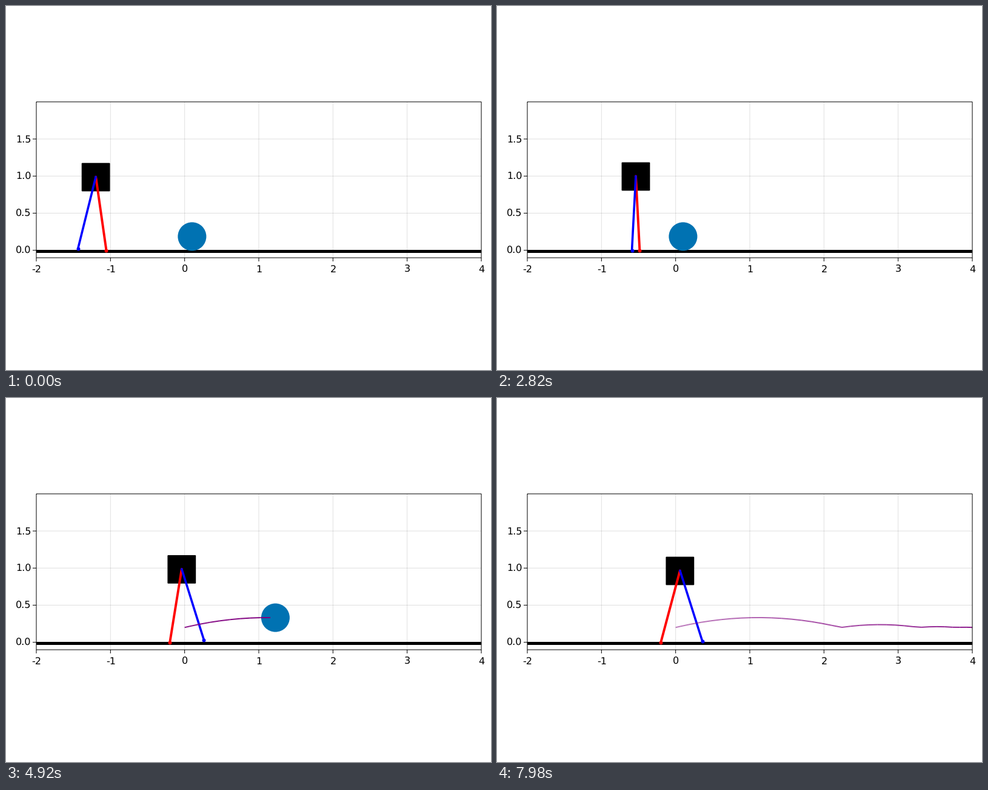
A matplotlib script for the animation above (8000 ms loop, 800x600 px).

```python
import numpy as np
import matplotlib.pyplot as plt
from matplotlib.animation import FuncAnimation
from matplotlib.collections import LineCollection
from matplotlib.patches import Circle, Rectangle

DPI = 100
PT = 72 / DPI                      # points per pixel
SCALE = 734 / 6                    # pixels per unit
LEFT, RIGHT, TOP, BOTTOM = 50, 784, 158, 415

plt.rcParams["font.family"] = "DejaVu Sans"
plt.rcParams["text.hinting"] = "none"
plt.rcParams["path.snap"] = False
fig = plt.figure(figsize=(8, 6), dpi=DPI, facecolor="white")
ax = fig.add_axes([0, 0, 1, 1])
ax.set_xlim(0, 800)
ax.set_ylim(600, 0)
ax.axis("off")


def px(x):
    return LEFT + (x + 2) * SCALE


def py(y):
    return 402.7 - y * SCALE


def line(xs, ys, color, width, z, **kw):
    kw.setdefault("solid_capstyle", "butt")
    return ax.plot(xs, ys, color=color, lw=width * PT, zorder=z, **kw)[0]


# Axis frame, grid and labels
for v in range(-2, 5):
    x = px(v)
    if -2 < v < 4:
        line([x, x], [TOP, BOTTOM], (0, 0, 0, 0.12), 1, 1)
    line([x, x], [BOTTOM, BOTTOM + 6], "black", 1, 9)
    ax.text(x + 0.5, 439, str(v), fontsize=16 * PT,
            ha="center", va="baseline")
for v in (0.0, 0.5, 1.0, 1.5):
    y = py(v)
    line([LEFT, RIGHT], [y, y], (0, 0, 0, 0.12), 1, 1)
    line([LEFT - 6, LEFT], [y, y], "black", 1, 9)
    ax.text(41.5, y + 5.5, f"{v:.1f}", fontsize=16 * PT,
            ha="right", va="baseline")
line([LEFT, RIGHT, RIGHT, LEFT, LEFT], [TOP, TOP, BOTTOM, BOTTOM, TOP],
     "black", 1, 9, solid_joinstyle="miter")
line([LEFT, RIGHT], [404.5, 404.5], "black", 5, 2)

# Moving parts
SIDE = 44.8                        # plus a rounded 2 px outline
ball = ax.add_patch(Circle((0, 0), 23.5, fc="#0072B2", ec="none", zorder=3))
body = ax.add_patch(Rectangle((0, 0), SIDE, SIDE, fc="black", ec="black",
                              lw=2 * PT, joinstyle="round", zorder=4))
legs = [line([], [], c, w, z, solid_capstyle="round")
        for c, w, z in (("red", 3.9, 5), ("blue", 3.6, 6))]
feet = [line([], [], c, 0, z, marker="o", ms=6 * PT, mew=0, ls="none")
        for c, z in (("red", 5), ("blue", 6))]
trail = ax.add_collection(LineCollection([], linewidths=2 * PT, zorder=7,
                                         capstyle="butt"))
window = Rectangle((LEFT, TOP), RIGHT - LEFT, BOTTOM - TOP,
                   transform=ax.transData)
for part in (ball, trail):
    part.set_clip_path(window)

# Inverted pendulum walk: mid-stance step and speed length of each stance
OMEGA = 0.0313
STRIDE = 0.2855
FIRST_FOOT = -1.056
MID = (15.7, 42.4, 67.3, 93.8)
REACH = (0.2975, 0.392, 0.313, 0.376)
STRIKES = (0, 30.7, 53.7, 81.5)
HALT = 114.3

KICK = 89
SPEED, REST, GRIP = 0.068, 0.535, 0.88
HOP, HEIGHT = 2.23, 0.133


def smooth(u):
    u = np.clip(u, 0, 1)
    return u * u * (3 - 2 * u)


def walker(k):
    """Hip, stance foot and swing foot at step k."""
    i = sum(k >= s for s in STRIKES) - 1
    foot = FIRST_FOOT + i * STRIDE
    lean = REACH[i] * np.sinh(OMEGA * (min(k, HALT) - MID[i]))
    hip = np.array([foot + lean, np.sqrt(1 - lean ** 2)])
    back = -0.385 if i == 0 else -STRIDE
    swing = 1 / (1 + np.exp(-0.7 * (k - STRIKES[i] - 9.4)))
    rel = back + (STRIDE - back) * swing
    if i == 3:
        rel += 0.275 * smooth((k - 97) / 17)
    lift = hip[1] - np.sqrt(1 - (rel - lean) ** 2)
    return hip, np.array([foot, 0]), np.array([foot + rel, max(lift, 0)])


def ball_at(k):
    """Bouncing ball: each hop is shorter, lower and slower."""
    if k < KICK:
        return 0.1, 0.186
    t, x, speed, span, height = k - KICK, 0, SPEED, HOP / SPEED, HEIGHT
    while span > 0.05:
        if t < span:
            u = t / span
            return x + speed * t, 0.2 + 4 * height * u * (1 - u)
        t -= span
        x += speed * span
        speed *= GRIP
        span *= REST
        height *= REST ** 2
    return x, 0.2


def step_at(frame):
    """Three quick steps, then a pause, every seven ticks."""
    cycle, tick = divmod(frame + 1, 7)
    return 3 * cycle + min(tick, 2)


def draw(frame):
    k = step_at(frame)
    hip, stance, swing = walker(k)
    hx, hy = px(hip[0]), py(hip[1])
    body.set_xy((hx - SIDE / 2, hy + 0.5 - SIDE / 2))
    for leg, mark, (fx, fy) in zip(legs, feet, (stance, swing)):
        leg.set_data([hx, px(fx)], [hy, py(fy)])
        mark.set_data([px(fx)], [py(fy)])

    bx, by = ball_at(k)
    ball.center = px(bx), py(by)

    times = [KICK] + list(range(KICK + 1, k + 1, 2)) if k > KICK else []
    path = [(px(x), py(y)) for x, y in map(ball_at, times)]
    trail.set_segments(list(zip(path[:-1], path[1:])))
    trail.set_color([(0.5, 0, 0.5, max(0, 1 - 0.006 * (k - t)))
                     for t in times[1:]])
    return [body, ball, trail, *legs, *feet]


anim = FuncAnimation(fig, draw, frames=400, interval=20, repeat=True,
                     repeat_delay=0, blit=False)
plt.show()
```
